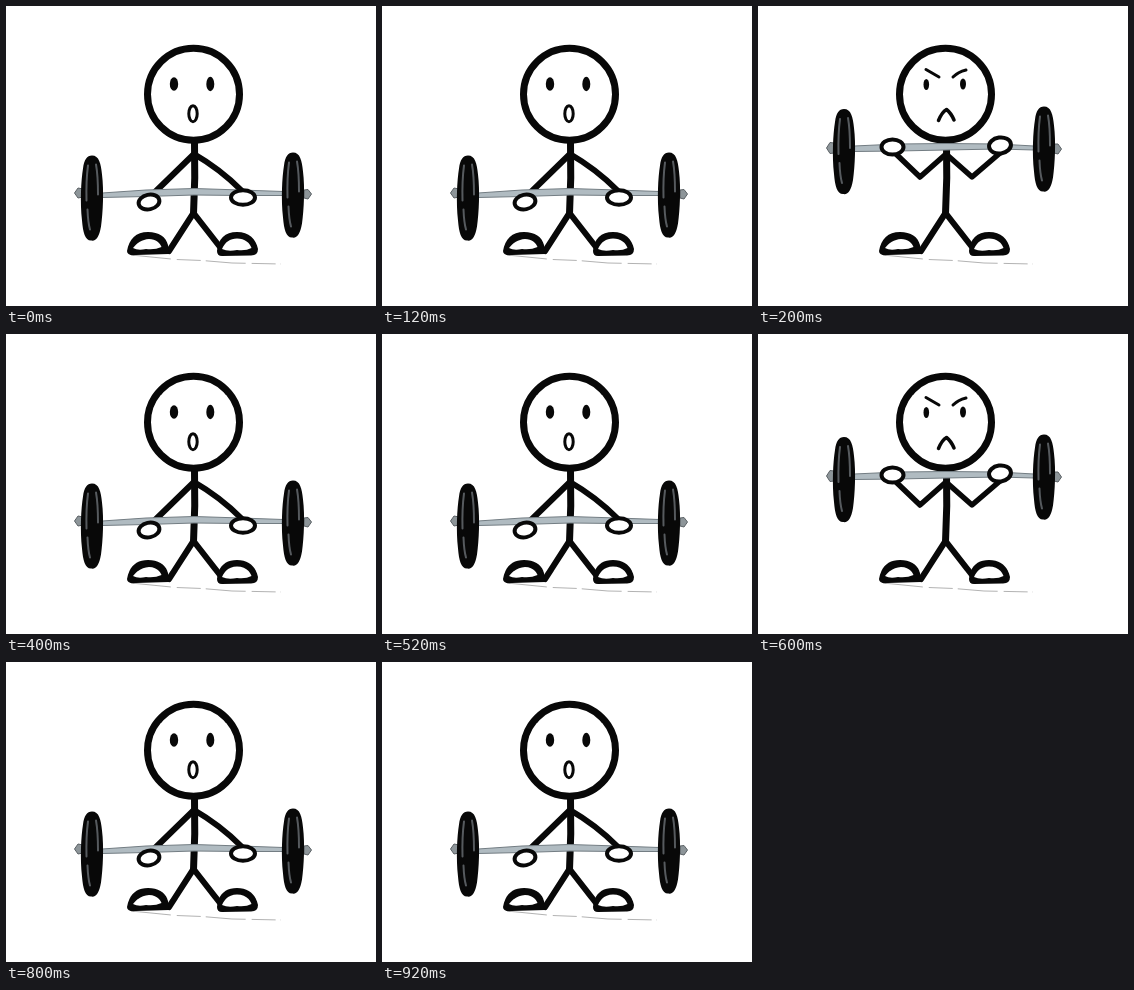
An HTML page that plays this animation: 370 px wide and 300 px high, repeating every 1000 ms.

```html
<!DOCTYPE html>
<html lang="en">
<head>
<meta charset="utf-8">
<title>Stick figure lifting a barbell</title>
<style>
html, body { margin: 0; width: 100%; height: 100%; overflow: hidden; background: #fff; }
svg { display: block; width: 100%; height: 100%; }
.ink { fill: none; stroke: #080808; stroke-width: 6; stroke-linecap: round; stroke-linejoin: round; }
.hand { fill: #fff; stroke-width: 4; }
.face { stroke-width: 3; }
.black { fill: #080808; }
.bar { fill: #b0bbc1; stroke: #737d83; stroke-width: 1; stroke-linejoin: round; }
.knob { fill: #8d9599; stroke: #5b6165; }
.shine { fill: none; stroke: #565a5e; stroke-width: 2; stroke-linecap: round; }
</style>
</head>
<body>
<svg viewBox="0 0 370 300">
  <defs>
    <g id="plate">
      <path class="black" d="M0-43C7-43 9-35 10-24C12-8 11 14 9 28C7 39 4 43-1 42C-7 42-9 34-10 22C-12 4-11-18-9-30C-8-39-5-43 0-43Z"/>
      <path class="shine" d="M-4-33Q-6-18-5.500 2M-4.500 11Q-4 24-2 31M4-34Q6-23 6-4"/>
    </g>
  </defs>

  <path fill="none" stroke="#aaa" stroke-width=".9" stroke-dasharray="40 6 24 5" d="M125 249L170 253.500L196 254.500L226 257L275 258"/>
  <path class="ink" d="M163 245L187.500 207L214 241"/>
  <path class="black" d="M121 245C123 233 130 226 142 226C153 226 160 231 162 239L163 248L130 249Q121 250 121 245Z"/>
  <path fill="#fff" d="M127 242C131 237 136 233.500 143 233C150 233 154 237 155.500 241Q149 244 140 243Q132 245 127 242Z"/>
  <path class="black" d="M211 245C212 233 219 226 231 226C243 226 250 233 252 243Q252 250 244 249.500L216 250Q211 250 211 245Z"/>
  <path fill="#fff" d="M216 243C219 236 224 232.500 231 232.500C239 232.500 244 237 245.500 242Q240 245 231 244Q222 246 216 243Z"/>
  <path class="ink" style="stroke-width:7" d="M188.500 136Q189.500 172 187.500 208"/>
  <circle class="ink" cx="187.500" cy="88.200" r="46" style="fill:#fff;stroke-width:7"/>

  <g id="low">
    <path class="ink" d="M148 187L188 148Q214 163 235 184"/>
    <path class="bar" d="M96 187L140 184L188 182.500L235 184L277 185.500V189.500L235 189.500L188 189L140 190.500L96 191.500Z"/>
    <path class="bar knob" d="M77 183L72 182L68.500 187L72 192L77 191ZM298 184L302 183.500L305.500 188L302 193L298 192Z"/>
    <use href="#plate" x="86" y="192.500"/>
    <use href="#plate" x="287" y="189.500"/>
    <ellipse class="ink hand" cx="143" cy="196" rx="10.500" ry="7.300" transform="rotate(-12 143 196)"/>
    <ellipse class="ink hand" cx="237" cy="191.500" rx="12" ry="7.300"/>
    <ellipse class="black" cx="168" cy="78" rx="4.200" ry="6.800"/>
    <ellipse class="black" cx="204.300" cy="78" rx="4" ry="7.200"/>
    <ellipse class="ink face" cx="187" cy="107.700" rx="4.200" ry="8"/>
  </g>

  <g id="high">
    <path class="ink" style="stroke-width:5.500" d="M138 148L162 171L188 148L214 171L242 147"/>
    <path class="bar" d="M96 140L140 138L188 137.500L240 138L276 140V144L240 143L188 144L140 145L96 145.500Z"/>
    <path class="bar knob" d="M76 137L72 136.500L68.500 142L72 147.500L76 147ZM296 138L300 138L303.500 143L300 148L296 147Z"/>
    <use href="#plate" x="86" y="146"/>
    <use href="#plate" x="286" y="143.500"/>
    <ellipse class="ink hand" cx="134.500" cy="141" rx="11" ry="7.500"/>
    <ellipse class="ink hand" cx="242" cy="139.500" rx="11" ry="8" transform="rotate(-8 242 139.500)"/>
    <ellipse class="black" cx="168.300" cy="78.500" rx="2.800" ry="5.500"/>
    <ellipse class="black" cx="205" cy="78" rx="3" ry="5.500"/>
    <path class="ink face" d="M168 63.500L181 71M195 71Q200 66 208 64"/>
    <path class="ink face" style="stroke-width:3.500" d="M180.500 114.500Q184 106 188.500 103.500Q193 107 196 114"/>
  </g>
</svg>
<script>
const show = (id, on) => document.getElementById(id).setAttribute("visibility", on ? "visible" : "hidden");

// Five beats per loop: low, high, low, high, low.
function draw(now) {
  const up = Math.floor(now % 1000 / 200) % 2 === 1;
  show("low", !up);
  show("high", up);
  requestAnimationFrame(draw);
}
draw(performance.now());
</script>
</body>
</html>
```
